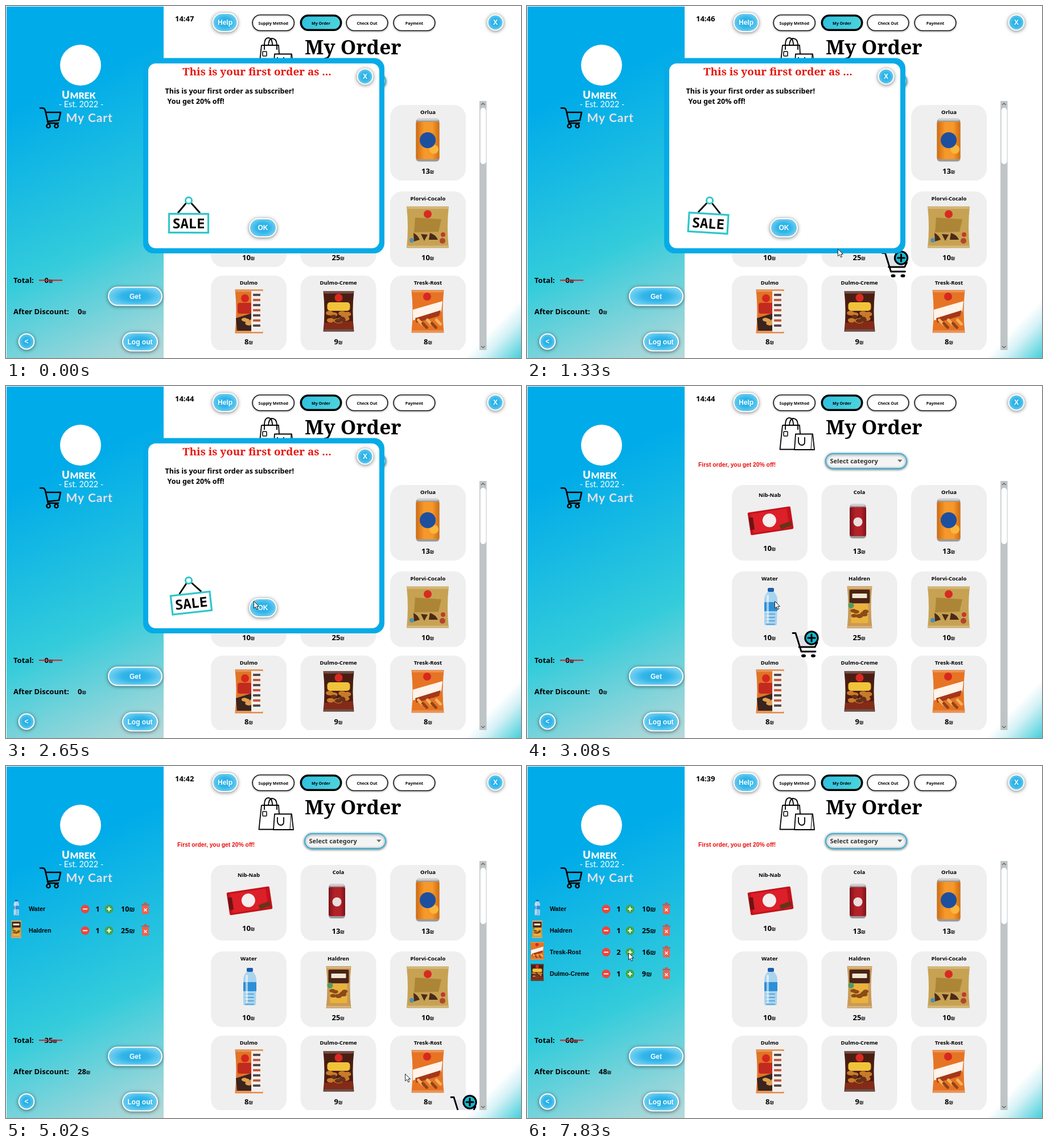
An HTML page with a canvas that plays this animation: 905 by 619 pixels, repeating every 8000 ms.

```html
<!DOCTYPE html>
<html lang="en">
<head>
<meta charset="utf-8">
<title>My Order</title>
<style>
html, body { margin: 0; width: 100%; height: 100%; overflow: hidden; background: #fff; }
canvas { display: block; width: 905px; height: 619px; }
</style>
</head>
<body>
<canvas id="stage"></canvas>
<script>
const W = 905, H = 619, LOOP = 8000;
const cv = document.getElementById('stage');
const c = cv.getContext('2d');
const dpr = window.devicePixelRatio || 1;
cv.width = W * dpr;
cv.height = H * dpr;

const SANS = '"Noto Sans", "Open Sans", sans-serif';
const ARIAL = '"Liberation Sans", Arial, sans-serif';
const SERIF = '"Noto Serif", serif';

// ---------- helpers ----------
function text(s, x, y, font, color = '#000', align = 'left', spacing = 0) {
  c.font = font;
  c.fillStyle = color;
  c.textAlign = align;
  c.letterSpacing = spacing + 'px';
  c.fillText(s, x, y);
  c.letterSpacing = '0px';
}
function box(x, y, w, h, r, fill, stroke, lw = 1) {
  c.beginPath();
  c.roundRect(x, y, w, h, r);
  paint(fill, stroke, lw);
}
function disc(x, y, r, fill, stroke, lw = 1) {
  c.beginPath();
  c.arc(x, y, r, 0, Math.PI * 2);
  paint(fill, stroke, lw);
}
function oval(x, y, rx, ry, fill) {
  c.beginPath();
  c.ellipse(x, y, rx, ry, 0, 0, Math.PI * 2);
  paint(fill);
}
function shape(d, fill, stroke, lw = 1) {
  const p = new Path2D(d);
  if (fill) { c.fillStyle = fill; c.fill(p); }
  if (stroke) { c.strokeStyle = stroke; c.lineWidth = lw; c.stroke(p); }
}
function paint(fill, stroke, lw) {
  if (fill) { c.fillStyle = fill; c.fill(); }
  if (stroke) { c.strokeStyle = stroke; c.lineWidth = lw; c.stroke(); }
}
function at(x, y, draw, scale = 1, angle = 0) {
  c.save();
  c.translate(x, y);
  c.rotate(angle);
  c.scale(scale, scale);
  draw();
  c.restore();
}
function shadow(blur, color = 'rgba(0,0,0,.55)', dy = 1) {
  c.shadowBlur = blur * dpr;
  c.shadowColor = color;
  c.shadowOffsetY = dy * dpr;
}
function ramp(g, stops) {
  stops.forEach(([p, col]) => g.addColorStop(p, col));
  return g;
}
function button(label, cx, cy, w, h, size = 12) {
  c.save();
  shadow(6);
  box(cx - w / 2, cy - h / 2, w, h, h / 2, '#fff');
  c.restore();
  c.save();
  c.beginPath();
  c.roundRect(cx - w / 2 + 2, cy - h / 2 + 2, w - 4, h - 4, h / 2 - 2);
  c.clip();
  c.translate(cx, cy);
  c.scale(w / 2, h / 2);
  c.fillStyle = ramp(c.createRadialGradient(0, 0, 0, 0, 0, 1),
    [[0, '#1fabe6'], [.5, '#33b6e9'], [1, '#74d0f1']]);
  c.fillRect(-1, -1, 2, 2);
  c.restore();
  text(label, cx, cy + size * .36, `bold ${size}px ${ARIAL}`, '#fff', 'center');
}
function price(n, x, y, size, coin) {
  const s = String(n);
  text(s, x, y, `bold ${size}px ${SANS}`);
  text('₪', x + c.measureText(s).width, y, `bold ${coin}px ${ARIAL}`);
}

// ---------- products, each drawn around its own centre ----------
function bag(w, h, fill) {
  const a = w / 2, b = h / 2;
  shape(`M${-a} ${-b} L${a} ${-b} Q${a - 4} 0 ${a} ${b} L${-a} ${b} Q${-a + 4} 0 ${-a} ${-b}Z`, fill);
  c.fillStyle = 'rgba(255,255,255,.25)';
  c.fillRect(-a + 1, -b + 1, w - 2, 3);
  c.fillRect(-a + 1, b - 4, w - 2, 3);
}
function can(w, h, fill, edge) {
  const a = w / 2, b = h / 2;
  box(-a, -b, w, h, 5, '#9a9a9c');
  box(-a + 2, -b - 1, w - 4, 4, 2, '#d0d0d2');
  const g = ramp(c.createLinearGradient(-a, 0, a, 0), [[0, edge], [.35, fill], [.7, fill], [1, edge]]);
  box(-a, -b + 5, w, h - 9, 3, g);
}
function puffs(n, spread, y, r, color) {
  for (let i = 0; i < n; i++) {
    oval(Math.sin(i * 2.4) * spread, y + Math.cos(i * 1.7) * spread * .45, r * 1.3, r * .8, color);
  }
}
const art = {
  wafer() {
    c.rotate(-.15);
    box(-38, -20, 76, 40, 2, '#c4121c');
    box(-33, -17, 64, 34, 2, '#dc1f28');
    disc(-2, -1, 12, '#f4eeee');
    shape('M14 10 L34 6 L36 14 L16 18Z', '#6a3318');
    box(-37, -11, 7, 22, 1, '#6b1512');
  },
  cola() {
    can(29, 60, '#b32229', '#7d1219');
    disc(0, 1, 8, '#eadfdd');
  },
  orange() {
    can(41, 75, '#f6982a', '#cf6c12');
    disc(11, 16, 8, '#f9b53c');
    disc(0, 0, 14, '#1d4f9f');
  },
  water() {
    box(-5, -33, 11, 7, 2, '#1b5fae');
    shape('M-5 -26 L6 -26 Q12 -20 12 -12 L11 30 Q11 33 8 33 L-7 33 Q-11 33 -11 30 L-11 -12 Q-11 -20 -5 -26Z', '#a9d4ee');
    box(-11, -8, 23, 16, 1, '#2e8fd6');
    for (let y = 12; y < 31; y += 6) box(-8, y, 16, 2, 1, '#5ba7db');
    box(-7, -21, 4, 50, 2, 'rgba(255,255,255,.55)');
  },
  pretzel() {
    bag(44, 74, '#c99a56');
    box(-18, -31, 36, 24, 2, '#4a2415');
    box(-13, -24, 26, 8, 1, '#f0e6d2');
    box(-15, -6, 30, 34, 2, '#eab23c');
    puffs(9, 11, 11, 4, '#8a4a1a');
    disc(-15, -3, 5, '#4f9a62');
  },
  cone() {
    bag(74, 73, '#c7a253');
    shape('M-22 -17 L24 -14 L19 8 L-24 9Z', '#ad8536');
    disc(0, -23, 7, '#d92a22');
    shape('M-25 10 Q-17 14 -14 22 L-24 25Z M4 10 Q14 13 18 22 L2 22Z M-12 12 L0 13 L-6 24Z', '#4b2a18');
    disc(27, 13, 4, '#c3392c');
    disc(26, 24, 5, '#b3442b');
    disc(-28, 23, 4, '#4f90b0');
  },
  puff() {
    bag(49, 77, '#df7426');
    disc(-7, -23, 7, '#d7261f');
    box(-20, -15, 26, 19, 4, '#c22a20');
    shape('M-23 12 L6 3 L6 34 L-21 34Z', '#3a241d');
    puffs(7, 8, 18, 4, '#e0a050');
    box(4, -36, 20, 72, 1, '#f2eeec');
    for (let y = -31; y < 32; y += 9) box(7, y, 13, 4, 1, y % 2 ? '#54494a' : '#c45a3c');
  },
  nougat() {
    bag(54, 71, '#4b1d12');
    shape('M-25 20 L25 17 L26 31 L-26 31Z', '#842b18');
    disc(0, -24, 7, '#d9291f');
    box(-20, -16, 40, 15, 5, '#f0c33a');
    puffs(10, 16, 10, 5, '#c97a2b');
    puffs(5, 9, 13, 4, '#66301a');
  },
  grill() {
    bag(57, 75, '#e67424');
    disc(-1, -26, 7, '#d7281f');
    shape('M-26 -3 L26 -18 L24 0 L-26 16Z', '#fff3ea');
    shape('M-22 12 L23 -2 L20 8 L-20 20Z', '#a53719');
    for (let i = 0; i < 5; i++) at(-13 + i * 8, 18 + (i % 2) * 6, () => box(-7, -2, 15, 5, 2, i % 2 ? '#92431c' : '#f6b25c'), 1, .8);
  }
};

// name, price, picture, picture centre relative to the card
const goods = [
  ['Nib-Nab', 10, 'wafer', 68, 63], ['Cola', 13, 'cola', 64, 64], ['Orlua', 13, 'orange', 66, 62],
  ['Water', 10, 'water', 68, 62], ['Haldren', 25, 'pretzel', 67, 63], ['Plorvi-Cocalo', 10, 'cone', 66, 63],
  ['Dulmo', 8, 'puff', 67, 63], ['Dulmo-Creme', 9, 'nougat', 67, 63], ['Tresk-Rost', 8, 'grill', 66, 63]
];
const colX = [360, 517.5, 675], rowY = [174, 326, 474];
const CARD = 133;

// ---------- timeline ----------
const CLOSE = 3070;
const clicks = [[3950, 3], [4500, 4], [5210, 8], [5470, 8], [6140, 7]];
const path = [
  [920, 745, 572], [1330, 546, 427], [1720, 486, 395], [1980, 403, 356], [2250, 418, 366], [2580, 435, 378],
  [3350, 435, 378], [3600, 487, 410], [3680, 477, 401], [3820, 489, 406], [3950, 489, 406],
  [4350, 588, 402], [4510, 592, 408], [4750, 662, 505], [4960, 701, 541], [5760, 702, 540],
  [6110, 612, 545], [6290, 612, 545], [6480, 308, 501], [6560, 308, 501],
  [7000, 205, 390], [7390, 171, 346], [7830, 178, 328]
];
function pointer(t) {
  if (t < path[0][0]) return null;
  let i = 0;
  while (i < path.length - 2 && t >= path[i + 1][0]) i++;
  const [t0, x0, y0] = path[i], [t1, x1, y1] = path[i + 1];
  const k = Math.min(1, (t - t0) / (t1 - t0));
  return [x0 + (x1 - x0) * k, y0 + (y1 - y0) * k];
}
function swing(t) {
  const span = 1890, u = t % span;
  return 8.7 * (1 - Math.pow(u / span, 1.5)) * Math.sin(u / 1064 * Math.PI * 2) * Math.PI / 180;
}

// ---------- scene parts ----------
function backdrop() {
  c.fillStyle = '#fff';
  c.fillRect(0, 0, W, H);
  c.fillStyle = ramp(c.createLinearGradient(855, 567, 907, 617),
    [[0, '#fff'], [.35, '#d3f1f6'], [1, '#45cfda']]);
  c.fillRect(780, 500, 125, 119);
  c.fillStyle = ramp(c.createLinearGradient(69, 155, 277, 619),
    [[0, '#00abe9'], [.56, '#34ccdb'], [1, '#b8d9d9']]);
  c.fillRect(1, 1, 276, 618);
}

function trolley() {
  c.lineCap = c.lineJoin = 'round';
  shape('M60 179.5 H65 Q68 180 69 184 L74 206 H92 M70 187 H96 L93 201 L73 203', null, '#000', 2.6);
  disc(74.5, 211, 3.2, null, '#000', 2.4);
  disc(88.5, 211, 3.2, null, '#000', 2.4);
  c.lineCap = 'butt';
  c.lineJoin = 'miter';
}

function bags() {
  c.lineJoin = 'round';
  shape('M449 69 H479 L480 84 M449 69 L444.5 111.5 H471', null, '#000', 1.8);
  shape('M454 77 V66 Q455 56 461 56 Q467 56 468 66 V69 M461 69 Q462 58 467 57 Q475 57 476 67 V77', null, '#000', 1.8);
  box(451, 80, 7, 8, 1, '#fff', '#000', 1.5);
  shape('M472 84.5 H502 L505 112 H470Z', '#fff', '#000', 1.8);
  shape('M477 90 V98 Q478 104 483 104 Q488 104 488 98 V90', null, '#000', 1.8);
  shape('M501 85 L499 111', null, '#000', 1);
  c.lineJoin = 'miter';
}

function tab(label, x, w, on) {
  c.save();
  if (!on) shadow(3, 'rgba(0,0,0,.4)');
  const g = ramp(c.createLinearGradient(x, 16, x + w, 44), [[0, '#2dbfe0'], [1, '#4fd6dc']]);
  const lw = on ? 3.6 : 1.3;
  box(x + lw / 2, 15 + lw / 2, w - lw, 29 - lw, 14, on ? g : '#fff', '#000', lw);
  c.restore();
  text(label, x + w / 2, 32.5, `bold 7px ${SANS}`, '#000', 'center');
}

function header(t) {
  text('14:' + (47 - Math.floor((t + 425) / 1000)), 297, 26.5, `bold 13px ${SANS}`);
  button('Help', 385, 29, 45, 34);
  tab('Supply Method', 432.5, 74.5, false);
  tab('My Order', 516.5, 74, true);
  tab('Check Out', 597.5, 74, false);
  tab('Payment', 680.5, 74, false);
  button('X', 860, 29, 29, 29);
  bags();
  text('My Order', 525, 85, `900 35px ${SERIF}`);
  text('First order, you get 20% off!', 301, 142, `bold 10.3px ${ARIAL}`, '#ec0c0c');
  c.save();
  shadow(4);
  box(525, 119, 142, 26, 13, '#f4f4f4', '#2fb7df', 1.8);
  c.restore();
  text('Select category', 532.5, 136, `bold 11px ${SANS}`, '#333');
  shape('M651 129.5 H659.5 L655.2 134Z', '#666');
}

function addIcon(x, y) {
  c.lineCap = c.lineJoin = 'round';
  shape(`M${x - 23} ${y - 20} H${x + 5} L${x + 13} ${y - 2} L${x - 14} ${y - 1}Z`, '#dfe2e6');
  shape(`M${x - 26} ${y - 24.5} H${x - 21} L${x - 11} ${y + 8} H${x + 14} M${x - 15} ${y} H${x + 13} L${x + 17} ${y - 8}`, null, '#000', 2.8);
  oval(x - 7, y + 15.5, 4, 2.8, '#000');
  oval(x + 10, y + 15.5, 4, 2.8, '#000');
  disc(x + 7, y - 16, 11.2, '#17b9d2', '#000', 3);
  shape(`M${x + 1} ${y - 16} H${x + 13} M${x + 7} ${y - 22} V${y - 10}`, null, '#000', 3);
  c.lineCap = 'butt';
  c.lineJoin = 'miter';
}

function shelf(hover) {
  c.save();
  c.beginPath();
  c.rect(280, 166, 552, 439);
  c.clip();
  goods.forEach(([name, cost, pic, px, py], i) => {
    const x = colX[i % 3], y = rowY[Math.floor(i / 3)];
    box(x, y, CARD, CARD, 21, '#efefef');
    at(x + px, y + py, art[pic]);
    text(name, x + CARD / 2, y + (i ? 16 : 21), `bold 9.5px ${SANS}`, '#000', 'center');
    price(cost, x + (cost > 9 ? 55 : 59), y + (i ? 120.5 : 116), 13, 8.5);
  });
  if (hover >= 0) addIcon(colX[hover % 3] + CARD, rowY[Math.floor(hover / 3)] + CARD);
  c.restore();
  c.fillStyle = '#bfc5c6';
  c.fillRect(832, 167, 12.5, 438);
  box(833.5, 179, 10, 99, 5, '#fff');
  shape('M835 174 L838.2 171 L841.5 174 M835 598 L838.2 601 L841.5 598', null, '#666', 1.3);
}

function cartRow(item, qty, y) {
  const [name, cost, pic] = goods[item];
  at(18, y - 2, art[pic], .42);
  text(name, 40, y + 4, `bold 10.6px ${ARIAL}`);
  [[139, '#f0443a'], [181, '#43a447']].forEach(([x, col], k) => {
    disc(x, y + .5, 7.5, col);
    c.fillStyle = '#fff';
    c.fillRect(x - 4, y - .5, 8, 2);
    if (k) c.fillRect(x - 1, y - 3.5, 2, 8);
  });
  text(qty, 161, y + 5, `bold 13px ${SANS}`, '#000', 'center');
  price(cost * qty, 202, y + 5, 12.5, 11.5);
  box(238, y - 8.5, 14, 3, 1, '#b9605c');
  box(242.5, y - 11, 5, 3, 1, '#b9605c');
  box(239, y - 5, 12, 14.5, 1.5, '#f2604c');
  shape(`M242.5 ${y - .5} l5 5 m0 -5 l-5 5`, null, '#fff', 1.5);
}

function sidebar(t) {
  disc(131, 104, 36, '#fff');
  text('U', 98, 163, '900 18.5px Lato, sans-serif', '#fff');
  text('MREK', 112.5, 163, '900 15.5px Lato, sans-serif', '#fff');
  text('- Est. 2022 -', 132, 178, '14.5px Lato, sans-serif', '#fff', 'center');
  trolley();
  text('My Cart', 105.5, 204, 'bold 21px Lato, "Open Sans", sans-serif', '#e6e0ea', 'left', .9);

  const cart = new Map();
  let total = 0;
  clicks.forEach(([when, item]) => {
    if (t < when) return;
    cart.set(item, (cart.get(item) || 0) + 1);
    total += goods[item][1];
  });
  [...cart].forEach(([item, qty], i) => cartRow(item, qty, 251 + i * 38));

  text('Total:', 13, 487, `bold 13px ${SANS}`);
  price(total, 67.5, 487, 13, 8.5);
  c.fillStyle = '#e8151b';
  c.fillRect(58, 481.3, 41, 2);
  text('After Discount:', 13, 542, `bold 13px ${SANS}`);
  price(Math.round(total * 8) / 10, 126, 542, 13, 8.5);
  button('Get', 227, 510.5, 96, 34);
  button('Log out', 235.5, 590.5, 63, 34);
  button('<', 36, 590, 29, 29);
}

function popup(t) {
  box(241, 91.5, 424, 343.5, 18, '#05abe7');
  box(250, 101, 406, 325, 13, '#fff');
  text('This is your first order as ...', 441, 122, `900 18.8px ${SERIF}`, '#e5170f', 'center');
  text('This is your first order as subscriber!', 279.5, 154, `bold 12.5px ${SANS}`);
  text('You get 20% off!', 283.5, 171.5, `bold 12.5px ${SANS}`);
  button('X', 631, 124, 29, 29);
  button('OK', 451.5, 390, 49, 34);
  at(321, 342, () => {
    shape('M-4 4 L-19 22 M4 4 L20 22', null, '#000', 2.8);
    box(-34.5, 23.5, 69, 33, 0, '#fff', '#2fc6cc', 3.2);
    text('SALE', 0, 49, 'bold 24px "Noto Sans Mono", "DejaVu Sans Mono", monospace', '#000', 'center');
  }, 1, swing(t));
  disc(321, 342, 5.6, '#fff', '#2fc6cc', 3);
}

function hovered(p, open) {
  if (!p || (open && p[1] < 424)) return -1;
  return goods.findIndex((g, i) => {
    const dx = p[0] - colX[i % 3], dy = p[1] - rowY[Math.floor(i / 3)];
    return dx >= 0 && dx < CARD && dy >= 0 && dy < CARD;
  });
}

function draw(t) {
  const open = t < CLOSE, p = pointer(t);
  c.setTransform(dpr, 0, 0, dpr, 0, 0);
  backdrop();
  header(t);
  shelf(hovered(p, open));
  sidebar(t);
  if (open) popup(t);
  if (p) at(p[0], p[1], () => shape('M.5 .5 V13 L3.5 10.3 L5.6 15 L7.8 14 L5.7 9.5 H9.5Z', '#fff', '#222', 1));
}

const start = performance.now();
function tick() {
  draw((performance.now() - start) % LOOP);
  requestAnimationFrame(tick);
}
tick();
</script>
</body>
</html>
```
